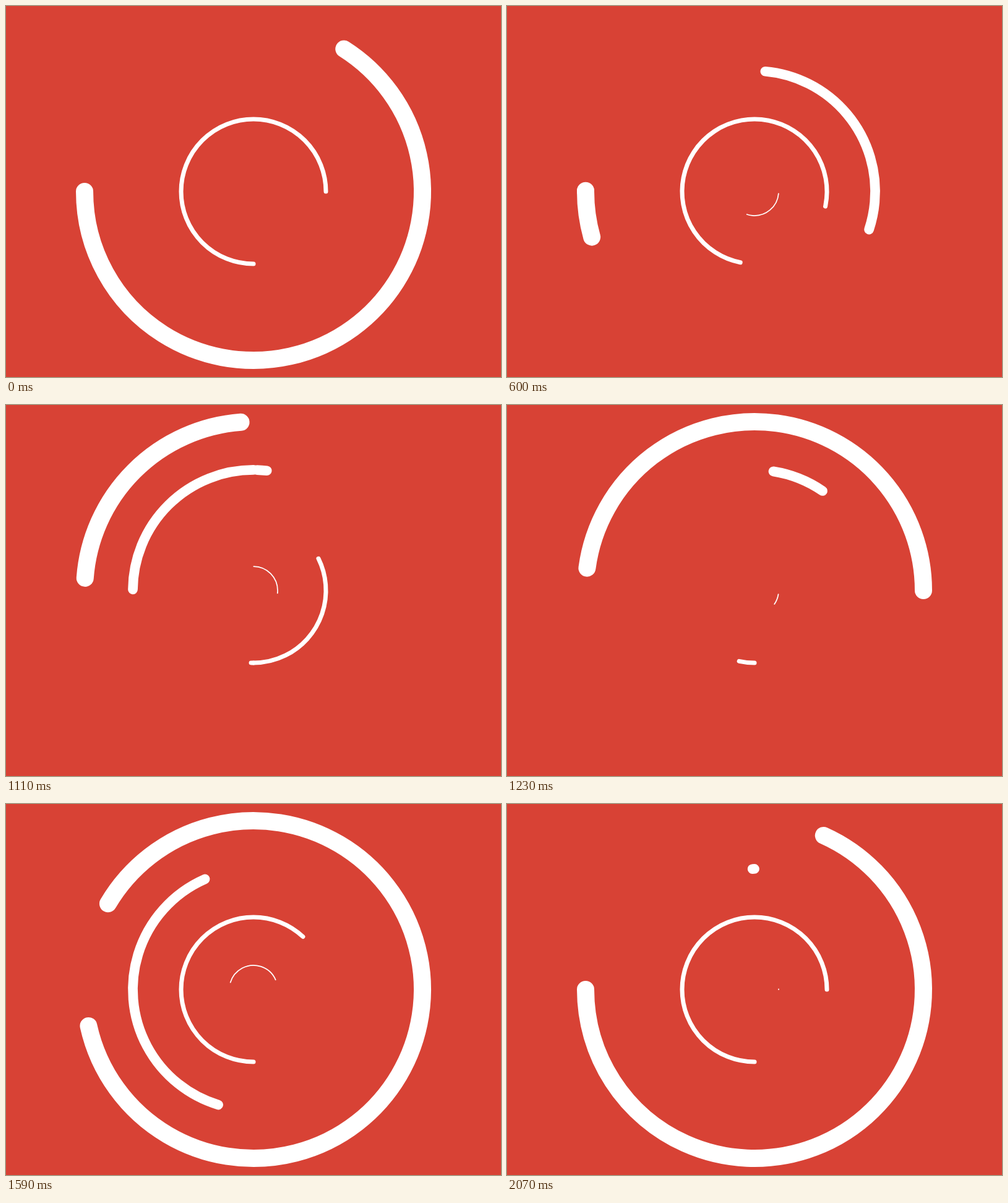
Write an HTML page with a canvas that moves like this. It is 800 by 600 pixels and loops after 2100 ms.

```html
<!DOCTYPE html>
<html lang="en">
<head>
<meta charset="utf-8">
<title>Rings</title>
<style>
  html, body { margin: 0; height: 100%; overflow: hidden; background: #d84235; }
  canvas { display: block; }
</style>
</head>
<body>
<canvas id="stage" width="800" height="600"></canvas>
<script>
const ctx = document.getElementById('stage').getContext('2d');
const LOOP = 2100, STEP = 30;

const easeIn = power => x => x ** power;
const quartIn = easeIn(4), quintIn = easeIn(5);
const quintInOut = x => x < 0.5 ? 16 * x ** 5 : 1 - 16 * (1 - x) ** 5;

// A value in degrees that goes from a to b between two times
const tween = (t0, t1, a, b, ease) => t =>
  a + (b - a) * ease(Math.min(1, Math.max(0, (t - t0) / (t1 - t0))));
const full = () => 360, none = () => 0;

// Each sweep is a pair: where the arc starts and where it ends
const double = [
  [tween(300, 1170, 0, 360, quartIn), tween(0, 810, 0, 360, quartIn)],
  [tween(810, 2340, 0, 360, quintInOut), tween(810, 1980, 0, 360, quintInOut)]
];
const threeQuarter = [
  [tween(0, 1200, 0, 360, quintIn), tween(0, 900, 270, 360, quintIn)],
  [none, tween(840, 2100, 0, 270, quintInOut)]
];
const single = [
  [tween(0, 900, 122.4, 360, quintInOut), full],
  [tween(360, 2100, 0, 122.4, quartIn), tween(360, 2100, 0, 360, quintInOut)]
];

const rings = [
  { origin: 0, sweeps: double },
  { origin: 90, sweeps: threeQuarter },
  { origin: 270, sweeps: double },
  { origin: 180, sweeps: single }
];

function arc(radius, from, to) {
  const rad = Math.PI / 180;
  ctx.beginPath();
  ctx.arc(400, 300, radius, from * rad, to * rad);
  ctx.stroke();
}

function draw() {
  const t = Math.floor(performance.now() % LOOP / STEP) * STEP;
  ctx.fillStyle = '#d84235';
  ctx.fillRect(0, 0, 800, 600);
  ctx.strokeStyle = '#fff';
  ctx.lineCap = 'round';
  rings.forEach(({ origin, sweeps }, i) => {
    ctx.lineWidth = 1.75 * (i + 1) ** 2;
    for (const [start, end] of sweeps) {
      const s = start(t), e = end(t);
      // A minimum length keeps the round caps of tiny arcs visible
      if (e > s) arc(39 * (2 * i + 1), origin + s, origin + Math.max(e, s + 0.05));
    }
  });
  requestAnimationFrame(draw);
}
draw();
</script>
</body>
</html>
```
